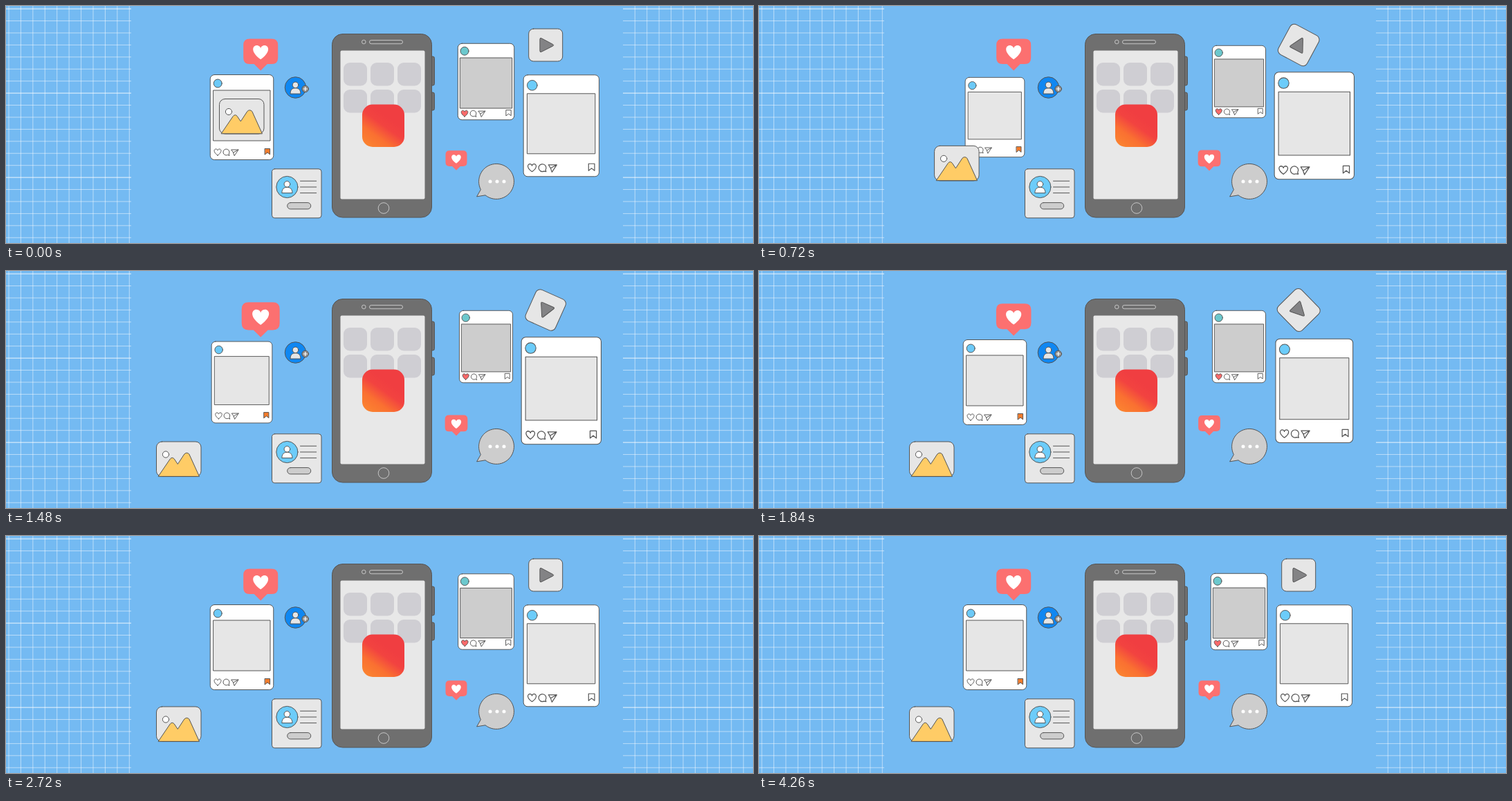
An HTML page that plays this animation: 1080 px wide and 343 px high, repeating every 4.28 s.

```html
<!DOCTYPE html>
<html lang="en">
<head>
<meta charset="utf-8">
<title>Social phone</title>
<style>
  html, body { margin: 0; width: 100%; height: 100%; overflow: hidden; background: #74baf2; }
  svg { display: block; width: 100%; height: 100%; }
  .line { stroke: #555; stroke-width: 1; stroke-linejoin: round; stroke-linecap: round; }
</style>
</head>
<body>
<svg id="stage" viewBox="0 0 1080 343">
  <defs>
    <linearGradient id="warm" x1=".1" y1="1" x2=".6" y2=".3">
      <stop offset="0" stop-color="#fb8530"/>
      <stop offset=".4" stop-color="#fa7031"/>
      <stop offset=".75" stop-color="#f24340"/>
      <stop offset="1" stop-color="#f03e41"/>
    </linearGradient>
    <path id="heart" d="M0 4.7C-7.2-.4-5.2-4.5-2.6-4.5-1-4.5 0-3.3 0-2.4 0-3.3 1-4.5 2.6-4.5 5.2-4.5 7.2-.4 0 4.7Z"/>
    <path id="talk" d="M4.2 4.6 3.5 2.6A4.5 4.5 0 1 0 1.6 4.2Z" fill="#fff"/>
    <path id="send" d="M-5-4H5L-.8 4.8-2.4.2ZM5-4-2.4.2" fill="#fff"/>
    <path id="mark" d="M-3.6-4.2H3.6V4.2L0 1.3-3.6 4.2Z"/>
    <g id="person" class="line">
      <path d="M-7.5 8.5C-7.5 2.5-4 .5 0 .5S7.5 2.5 7.5 8.5Z"/>
      <circle cy="-4" r="4.3"/>
    </g>
    <g id="like">
      <path fill="#fc7070" d="M-16-22.5H16Q25-22.5 25-13.5V5Q25 14 16 14H9.5L0 23.5-9.5 14H-16Q-25 14-25 5V-13.5Q-25-22.5-16-22.5Z"/>
      <use href="#heart" fill="#fff" transform="translate(0 -3) scale(2.2)"/>
    </g>
  </defs>

  <rect width="1080" height="343" fill="#74baf2"/>
  <g id="grid" stroke="#fff"></g>

  <g class="line" fill="#6f6f6f">
    <rect x="610" y="73" width="9.5" height="42" rx="2.5"/>
    <rect x="610" y="125" width="9.5" height="26" rx="2.5"/>
    <rect x="471.5" y="40.5" width="144" height="265.5" rx="15"/>
  </g>
  <rect x="483.5" y="64.5" width="122" height="215" rx="2" fill="#e8e8e8"/>
  <g fill="none" stroke="#d0d0d0" stroke-width=".9">
    <circle cx="517.3" cy="52" r="2.8"/>
    <rect x="525.5" y="49.5" width="48" height="5.2" rx="2.6"/>
    <circle cx="546" cy="292.5" r="7.8"/>
  </g>
  <g id="tiles" fill="#cfced3"></g>
  <rect x="515" y="142.5" width="61" height="61.5" rx="15" fill="url(#warm)"/>

  <g id="parts"></g>
</svg>

<script>
const LOOP = 4280;
const el = id => document.getElementById(id);

// Squared paper on both sides
const CELL = 17.43;
let grid = '';
for (const [left, right, first] of [[0, 181, 4], [892, 1080, 909.3]]) {
  for (let x = first; x < right; x += CELL)
    grid += `<path d="M${x} 0V343" opacity=".5"/>`;
  for (let i = 0; i < 20; i++)
    grid += `<path d="M${left} ${4.1 + i * CELL}H${right}" opacity="${i % 7 ? 0.5 : 0.85}"/>`;
}
el('grid').innerHTML = grid;

let tiles = '';
for (let i = 0; i < 6; i++)
  tiles += `<rect x="${488 + i % 3 * 39}" y="${i < 3 ? 82 : 121}" width="34" height="33.5" rx="9"/>`;
el('tiles').innerHTML = tiles;

// Shapes are drawn around the part's own centre
const box = (x, y, w, h, r, fill) =>
  `<rect class="line" x="${x}" y="${y}" width="${w}" height="${h}" rx="${r}" fill="${fill}"/>`;
const disc = (x, y, r, fill) =>
  `<circle class="line" cx="${x}" cy="${y}" r="${r}" fill="${fill}"/>`;
const icon = (name, x, y, fill, size = 1) =>
  `<use href="#${name}" class="line" fill="${fill}" transform="translate(${x} ${y}) scale(${size})"/>`;

function post({ w, h, avatar, avatarFill, picture, pictureFill, row, icons, size, heart, mark }) {
  return box(-w / 2, -h / 2, w, h, 6, '#fff') +
    disc(...avatar, avatarFill) +
    box(...picture, 0, pictureFill) +
    icon('heart', icons[0], row, heart, size) +
    icon('talk', icons[1], row, '#fff', size) +
    icon('send', icons[2], row + 0.5, '#fff', size) +
    icon('mark', icons[3], row - 0.8, mark, size);
}

const quad = x => x < 0.5 ? 2 * x * x : 1 - 2 * (1 - x) ** 2;

// Keys are [time, value] pairs, eased in and out
function track(keys, t) {
  const next = keys.findIndex(k => k[0] > t);
  if (next < 0) return keys[keys.length - 1][1];
  const [t0, a] = keys[next - 1], [t1, b] = keys[next];
  return a + (b - a) * quad((t - t0) / (t1 - t0));
}

const pop = [[0, 1], [300, 1.09], [600, 1]];
const swell = [[0, 1], [270, 1.055], [1600, 1.055], [2120, 0.978], [2700, 1]];
const slide = [[0, 0], [1300, 1]];

const parts = [
  {
    x: 341, y: 161, scale: [[0, 1], [280, 0.937], [1250, 0.937], [1810, 1]],
    art: post({
      w: 91.5, h: 123, avatar: [-34.8, -49, 6], avatarFill: '#6cc9f7',
      picture: [-41, -39, 82, 73], pictureFill: '#e6e6e6',
      row: 50.5, icons: [-35, -22.3, -10, 37], size: 1, heart: '#fff', mark: '#f47b2a'
    })
  },
  {
    x: 694, y: 109.5, scale: [[0, 1], [300, 1.09], [700, 0.945], [2300, 0.945], [2900, 1]],
    art: post({
      w: 81.5, h: 110.5, avatar: [-31, -44.3, 6], avatarFill: '#6cc8cd',
      picture: [-37.3, -34.5, 75, 73], pictureFill: '#cdcdcd',
      row: 46, icons: [-31, -18.3, -6, 32.7], size: 0.97, heart: '#fa6a6a', mark: '#fff'
    })
  },
  {
    x: 802.8, y: 173.3, scale: swell,
    art: post({
      w: 109.3, h: 147, avatar: [-42, -58.5, 7.3], avatarFill: '#6cccfa',
      picture: [-49, -46.5, 98, 87], pictureFill: '#e6e6e6',
      row: 60.8, icons: [-42.3, -27, -12.5, 43.8], size: 1.2, heart: '#fff', mark: '#fff'
    })
  },
  {
    x: 340.8, y: 160, slide: [-91, 112.5],
    art: box(-32.3, -25.5, 64.5, 50.5, 8, '#e6e6e6') + disc(-18.8, -7, 4.6, '#fff') +
      `<path class="line" fill="#ffcc66" d="M-29.5 24.5-12.5-.5Q-9.5-4-6.5-.5L-1.5 7 8-7.5Q11.5-11 15-7.5L29.5 24.5Z"/>`
  },
  { x: 368.2, y: 70, scale: [[0, 1], [300, 0.96], [650, 1], [1100, 1], [1500, 1.1], [1950, 1]], art: '<use href="#like"/>' },
  { x: 651, y: 223.2, scale: swell, art: '<use href="#like" transform="scale(.62)"/>' },
  {
    x: 418.5, y: 118, scale: pop,
    art: disc(0, 0, 15.3, '#0f87f2') + icon('person', 0, 0.3, '#e6e6e6') + disc(14.2, 2, 4.8, '#8f8f8f') +
      '<path stroke="#fff" stroke-width="1.2" d="M11.2 2H17.2M14.2-1V5"/>'
  },
  {
    x: 420.2, y: 271.3, scale: pop,
    art: box(-35.7, -35.5, 71.5, 71, 4, '#e7e7e7') + disc(-13.8, -9.3, 15.6, '#6cccfa') +
      icon('person', -13.8, -9.5, '#fff') +
      '<path class="line" d="M5.3-18H28.5M5.3-9.3H28.5M5.3-.7H28.5"/>' +
      box(-13.5, 13.3, 34, 9.3, 4.6, '#cdcdcd')
  },
  {
    x: 709, y: 254, scale: pop,
    art: '<path class="line" fill="#cdcdcd" d="M-22.8 11.4A25.5 25.5 0 1 1-16 19.8L-28 21.8Z"/>' +
      [-9, 1, 11].map(x => `<circle cx="${x}" r="2.5" fill="#fff"/>`).join('')
  },
  {
    x: 780.2, y: 56.5, turn: [[0, 0], [2460, -360]],
    art: box(-24.5, -23.5, 49, 47, 7, '#e6e6e6') +
      '<path class="line" fill="#838385" d="M-8.3-8.7Q-8.3-11-6-9.8L10.5-1Q12.5.2 10.5 1.4L-6 9.8Q-8.3 11-8.3 8.7Z"/>'
  }
];

el('parts').innerHTML = parts.map(p => `<g>${p.art}</g>`).join('');
const groups = [...el('parts').children];

function draw() {
  const t = performance.now() % LOOP;
  parts.forEach((p, i) => {
    const moved = p.slide ? track(slide, t) : 0;
    const [dx, dy] = p.slide || [0, 0];
    const scale = p.scale ? track(p.scale, t) : 1;
    const turn = p.turn ? track(p.turn, t) : 0;
    groups[i].setAttribute('transform',
      `translate(${p.x + dx * moved} ${p.y + dy * moved}) rotate(${turn}) scale(${scale})`);
  });
  requestAnimationFrame(draw);
}
draw();
</script>
</body>
</html>
```
